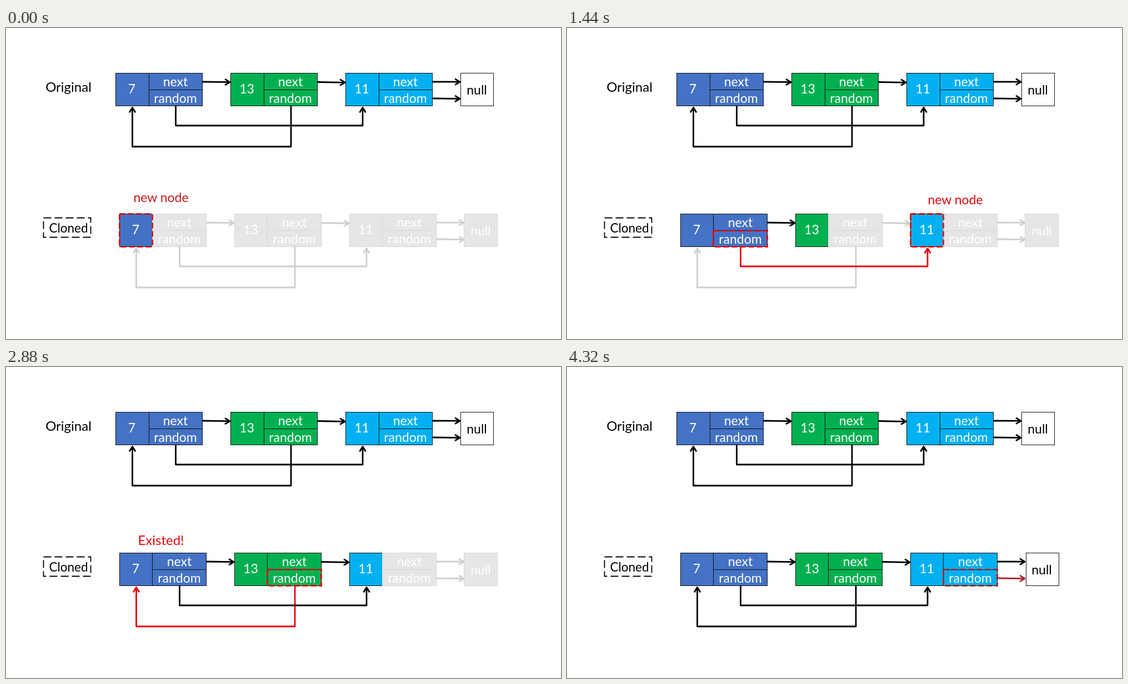
Recreate the animation shown at these times as an HTML page. Size 999 px wide and 561 px high, loop 5.04 s.

```html
<!DOCTYPE html>
<html lang="en">
<head>
<meta charset="utf-8">
<title>Cloning a linked list</title>
<style>
  html, body { margin: 0; width: 100%; height: 100%; overflow: hidden; background: #fff; }
  svg { display: block; width: 999px; height: 561px; }
  text { font: 23px "Comic Sans MS", Lato, sans-serif; text-anchor: middle; }
  .line { fill: none; stroke-width: 2.8; stroke-linejoin: round; }
  .fresh { fill: none; stroke-width: 3; stroke-dasharray: 10 5; }
  .step { animation: show 5040ms step-end infinite; }
  @keyframes show {
    0% { visibility: visible; }
    14.2857%, 100% { visibility: hidden; }
  }
</style>
</head>
<body>
<svg id="stage" viewBox="0 0 999 561"></svg>
<script>
const STEP = 720, STEPS = 7;
const GREY = '#e7e6e6', GREY_EDGE = '#d6d4d4', GREY_LINE = '#d0cece';
const REDS = ['#c8191e', '#e3060c', '#e3060c', '#c8161a', '#e3060c', '#b3161c', '#a8262e'];

// "at" is the step in which a part of the copy comes to life
const nodes = [
  { x: 197.5, value: 7, color: '#4472c4', at: 0, next: 1, random: 2 },
  { x: 404.5, value: 13, color: '#00b050', at: 1, next: 3, random: 4 },
  { x: 611.5, value: 11, color: '#00b0f0', at: 2, next: 5, random: 6 }
];
const NULL_AT = 5;
const links = [
  { at: 1, pts: [[353, 97], [403, 97.7]] },
  { at: 3, pts: [[560, 97.5], [610, 98.3]] },
  { at: 5, pts: [[767.5, 97], [817, 97.2]] },
  { at: 6, pts: [[767.5, 127], [817, 127.6]] },
  { at: 4, pts: [[513, 141], [513, 214], [227.5, 214], [227.5, 143.5]] },
  { at: 2, pts: [[305.5, 141], [305.5, 176], [642, 176], [642, 143.5]] }
];
const labels = [
  ['new node', 279, 313.5],
  ['new node', 491.5, 310.5],
  ['new node', 699, 318],
  ['Existed!', 693, 318],
  ['Existed!', 279, 321]
];

const text = (s, x, y, fill, size = 23) =>
  `<text x="${x}" y="${y}" fill="${fill}" style="font-size:${size}px">${s}</text>`;

const rect = (x, y, w, h, fill, stroke) =>
  `<rect x="${x}" y="${y}" width="${w}" height="${h}" fill="${fill}" stroke="${stroke}"/>`;

function arrow(pts, color) {
  const [[px, py], [x, y]] = pts.slice(-2);
  const len = Math.hypot(x - px, y - py), ux = (x - px) / len, uy = (y - py) / len;
  const wing = s => `${x - 9 * ux - s * 5.5 * uy} ${y - 9 * uy + s * 5.5 * ux}`;
  return `<path class="line" stroke="${color}" d="M${pts.join('L')}M${wing(1)}L${x} ${y}L${wing(-1)}"/>`;
}

function list(step, split, nullX) {
  const red = REDS[step];
  const cells = nodes.flatMap(n => [
    { x: n.x, y: 81.5, w: split, h: 59, at: n.at, color: n.color, label: n.value, tx: n.x + 29, ty: 118 },
    { x: n.x + split, y: 81.5, w: 156 - split, h: 30, at: n.next, color: n.color, label: 'next', tx: n.x + 107.5, ty: 105 },
    { x: n.x + split, y: 111.5, w: 156 - split, h: 29, at: n.random, color: n.color, label: 'random', tx: n.x + 107.5, ty: 134.5 }
  ]);
  const live = cells.filter(c => c.at <= step), idle = cells.filter(c => c.at > step);
  const hasNull = step >= NULL_AT;
  return [
    ...live.map(c => rect(c.x, c.y, c.w, c.h, c.color, '#111')),
    ...idle.map(c => rect(c.x, c.y, c.w, c.h, GREY, GREY_EDGE)),
    hasNull ? rect(nullX, 81.5, 59, 59, '#fff', '#111') : rect(817.5, 81.5, 60, 59, GREY, GREY_EDGE),
    text('null', 847.5, 119.5, hasNull ? '#000' : '#fff'),
    ...links.map(l => arrow(l.pts, l.at > step ? GREY_LINE : l.at === step ? red : '#000')),
    ...live.filter(c => c.at === step).map(c =>
      `<path class="fresh" stroke="${red}" d="M${c.x} ${c.y}h${c.w}v${c.h}h${-c.w}z"/>`),
    ...cells.map(c => text(c.label, c.tx, c.ty, '#fff'))
  ].join('');
}

let art = text('Original', 112.5, 115, '#000', 24) + list(Infinity, 60, 818.5)
  + '<rect x="67.5" y="342.5" width="85" height="35" fill="none" stroke="#000" stroke-width="1.8" stroke-dasharray="14 6"/>'
  + text('Cloned', 112.5, 369, '#000', 22.5);

for (let i = 0; i < STEPS; i++) {
  const [s, x, y] = labels[i] || [];
  art += `<g class="step" style="animation-delay:${(i - STEPS) * STEP}ms">`
    + `<g transform="translate(7 254)">${list(i, 59, 819.5)}</g>`
    + (s ? text(s, x, y, REDS[i], s === 'Existed!' ? 24 : 23) : '') + '</g>';
}
document.getElementById('stage').innerHTML = art;
</script>
</body>
</html>
```
